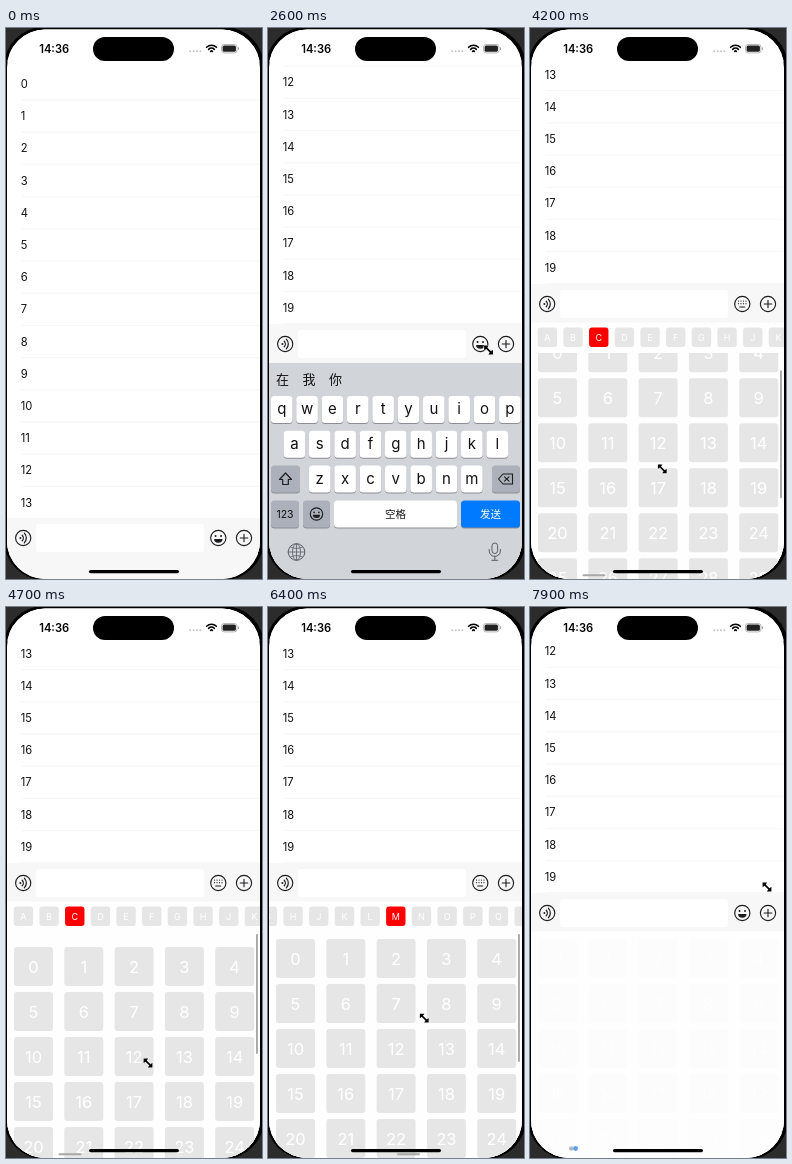
An HTML page for the animation above (8 s loop, 256 by 551 pixels).

```html
<!DOCTYPE html>
<html lang="zh">
<head>
<meta charset="utf-8">
<title>Chat input panels</title>
<style>
html, body { margin: 0; width: 100%; height: 100%; overflow: hidden; background: #000; }
svg { display: block; width: 100vw; height: 100vh; font-family: Inter, "Noto Sans CJK SC", "Noto Sans CJK", sans-serif; }
</style>
</head>
<body>
<svg id="stage" viewBox="0 0 256 551" preserveAspectRatio="none"></svg>
<script>
const LOOP = 8000, STEP = 100;
const ROW = 32.2, PAGE = 253, TAB = 25.67, TAB_START = 17.4, CENTER = 127.8;
const LETTERS = 'ABCDEFGHJKLMNOPQRSTWXYZ';
const INK = '#1c1c1e', THUMB = '#a8a8a8', TILE = '#e6e6e6';
const stage = document.getElementById('stage');

const rect = (x, y, w, h, fill, rx = 0, extra = '') =>
  `<rect x="${x}" y="${y}" width="${w}" height="${h}" rx="${rx}" fill="${fill}" ${extra}/>`;
const text = (x, y, size, s, fill = '#111', anchor = 'middle', extra = '') =>
  `<text x="${x}" y="${y}" font-size="${size}" fill="${fill}" text-anchor="${anchor}" ${extra}>${s}</text>`;
const line = (d, width = 1.1, color = INK) =>
  `<path d="${d}" fill="none" stroke="${color}" stroke-width="${width}" stroke-linecap="round" stroke-linejoin="round"/>`;
const ring = (x, y, r, width = 1.15, color = INK) =>
  `<circle cx="${x}" cy="${y}" r="${r}" fill="none" stroke="${color}" stroke-width="${width}"/>`;
const dot = (x, y, r, fill = INK) => `<circle cx="${x}" cy="${y}" r="${r}" fill="${fill}"/>`;
const group = (id, body) => `<g id="${id}">${body}</g>`;
const repeat = (n, fn) => Array.from({ length: n }, (_, i) => fn(i)).join('');
// Arc opening sideways (turn 0) or upwards (turn -90) around a centre.
const arc = (x, y, r, turn, width, color) =>
  `<g transform="translate(${x} ${y}) rotate(${turn})">`
  + line(`M${r * .7} ${-r * .7}A${r} ${r} 0 0 1 ${r * .7} ${r * .7}`, width, color) + '</g>';
const face = (x, y, r) => dot(x - r * .36, y - r * .25, r * .13) + dot(x + r * .36, y - r * .25, r * .13)
  + `<path d="M${x - r * .55} ${y + r * .12}h${r * 1.1}a${r * .55} ${r * .5} 0 0 1 ${-r * 1.1} 0Z" fill="${INK}"/>`;

function statusBar() {
  return rect(87, 9, 81, 24, '#000', 12)
    + text(33.2, 24.6, 11.2, '14:36', '#000', 'start', 'font-weight="600"')
    + repeat(4, i => dot(184.2 + i * 3.4, 23.3, 1, '#c4c4c6'))
    + repeat(3, i => arc(205.5, 24.2, 1.2 + i * 2.9, -90, 1.6, '#000'))
    + rect(215.5, 16.5, 15.5, 8.4, 'none', 2.6, 'stroke="#a5a5a8" stroke-width=".8"')
    + rect(216.6, 17.6, 13.3, 6.2, '#222', 1.6)
    + rect(232, 19.3, 1, 2.8, '#a5a5a8', .5);
}

function messageList() {
  return repeat(20, i => text(14.7, 60 + i * ROW, 11.2, i, '#111', 'start')
    + line(`M16 ${72 + i * ROW}H253`, .6, '#efeff0'));
}

function inputBar() {
  const y = 20, r = 7.6;
  const keys = repeat(8, i => dot(208.5 + i % 4 * 2.5, y - 2.9 + Math.floor(i / 4) * 2.6, .6))
    + line(`M209.7 ${y + 3}h5`);
  return rect(1, 0, PAGE, 38.5, '#f7f7f8')
    + rect(30, 6, 168, 28, '#fff', 3)
    + ring(17.2, y, r) + dot(14.4, y, 1) + repeat(2, i => arc(13.4, y, 4 + i * 3, 0, 1.25))
    + ring(212.3, y, r) + group('smile', face(212.3, y, r)) + group('keysIcon', keys)
    + ring(238, y, r) + line(`M234.2 ${y}h7.6M238 ${y - 3.8}v7.6`);
}

function keyboard() {
  const gray = '#abb0ba', tool = '#5b5f66';
  const key = (x, y, w, fill = '#fff') =>
    rect(x, y + 1, w, 27, '#8b8e94', 3.5) + rect(x, y, w, 27, fill, 3.5);
  const rows = ['qwertyuiop', 'asdfghjkl', 'zxcvbnm'].map((row, r) => repeat(row.length, i => {
    const x = CENTER + (i - (row.length - 1) / 2) * 25.35, y = 368 + r * 34.75;
    return key(x - 10.8, y, 21.6) + text(x, y + 18, 15, row[i]);
  })).join('');
  return rect(1, 335, PAGE, 217, '#d1d4d9')
    + repeat(3, i => text(14.5 + i * 26.5, 356, 13, '在我你'[i]))
    + rows
    + key(3, 437.5, 29, gray) + line('M17.5 445l-6 6.5h3.2v5h5.6v-5h3.2Z', 1.2)
    + key(224, 437.5, 28, gray) + line('M235 446h9.5v10h-9.5l-4.5-5ZM236.5 448.8l4.5 4.4m0-4.4l-4.5 4.4')
    + key(3, 472.5, 28, gray) + text(17, 490, 10.5, '123')
    + key(35, 472.5, 27, gray) + ring(48.5, 486, 6.2) + face(48.5, 486, 6.6)
    + key(66, 472.5, 123) + text(127.5, 490, 10.5, '空格')
    + key(193, 472.5, 59, '#007aff') + text(222.5, 490, 10.5, '发送', '#fff')
    + ring(28.5, 524, 8.3, 1, tool)
    + line('M20.2 524h16.6M28.5 515.7v16.6M22.5 519q6 3 12 0M22.5 529q6 -3 12 0', .8, tool)
    + `<ellipse cx="28.5" cy="524" rx="4" ry="8.3" fill="none" stroke="${tool}" stroke-width=".8"/>`
    + rect(224, 515, 5.6, 10.5, 'none', 2.8, `stroke="${tool}"`)
    + line('M221.2 521.5v1.5a5.6 5.4 0 0 0 11.2 0v-1.5M226.8 528.4v3.9m-3 0h6', 1, tool);
}

function stickerPanel() {
  const tabs = repeat(LETTERS.length, i =>
    rect(TAB_START + i * TAB - 9.7, 299.5, 19.4, 19.4, TILE, 3, 'class="tab"')
    + text(TAB_START + i * TAB, 312.6, 9, LETTERS[i], '#fff'));
  const page = left => repeat(45, i => {
    const x = left + 8 + i % 5 * 50.3, y = 332 + Math.floor(i / 5) * 45;
    return rect(x, y, 39, 39, TILE, 3) + text(x + 19.5, y + 25.5, 16.5, i, '#fff');
  });
  return rect(1, 294, PAGE, 258, '#fefefe')
    + group('panelContent',
      group('tabs', tabs)
      + `<g clip-path="url(#gridClip)">${group('grid', page(0) + page(PAGE))}</g>`
      + rect(0, 546.3, 23, 1.9, THUMB, 1, 'id="hThumb"')
      + rect(250, 327, 1.9, 128, THUMB, 1, 'id="vThumb"'));
}

const arrowHead = 'M-4.4 -4.4h4.6l-1.5 1.9L2.5 1.3L4.4 -.2v4.6h-4.6l1.5 -1.9L-2.5 -1.3L-4.4 .2Z';

stage.innerHTML = `<defs>
  <clipPath id="screen"><rect x="1" y="1.5" width="253" height="549.5" rx="38"/></clipPath>
  <clipPath id="gridClip"><rect x="1" y="325" width="253" height="226"/></clipPath></defs>`
  + rect(0, 0, 256, 551, '#2c2c2d')
  + rect(-2, -1, 260, 553, '#000', 40)
  + '<g clip-path="url(#screen)">'
  + rect(0, 0, 256, 551, '#fff')
  + group('list', messageList())
  + rect(0, 0, 256, 34, '#fff')
  + statusBar()
  + rect(1, 0, PAGE, 552, '#f7f7f8', 0, 'id="footer"')
  + group('keyboard', keyboard())
  + group('panel', stickerPanel())
  + group('bar', inputBar())
  + group('menuHint', dot(41.3, 541.5, 2.3, '#b4b9c0') + dot(45.6, 541.5, 2.4, '#5aa2ee'))
  + rect(83, 542, 90, 3.2, '#000', 1.6)
  + '</g>'
  + group('cursor', `<path d="${arrowHead}" stroke="#fff" paint-order="stroke"/>`);

const el = Object.fromEntries([...stage.querySelectorAll('[id]')].map(n => [n.id, n]));
const tabRects = [...stage.querySelectorAll('.tab')];

const progress = (t, from, to) => Math.min(1, Math.max(0, (t - from) / (to - from)));
const ramp = (t, from, to) => {
  const u = progress(t, from, to);
  return u * u * (3 - 2 * u);
};
const swing = (t, from, to) => Math.sin(Math.PI * progress(t, from, to));
const within = (t, from, to) => t >= from && t < to;
const move = (node, x, y) => node.setAttribute('transform', `translate(${x} ${y})`);
const show = (node, on) => node.setAttribute('visibility', on ? 'visible' : 'hidden');

// Places where the pointer rests: time, x, y.
const rests = [[200, 130, 430], [900, 130, 190], [1500, 115, 510], [2600, 220.5, 322],
  [3600, 119.5, 421], [4700, 142, 456], [5900, 172, 393], [7000, 135.5, 435], [7900, 237, 280]];
function pointer(t) {
  const i = Math.max(1, rests.findIndex(r => r[0] >= t));
  const [t0, x0, y0] = rests[i - 1], [t1, x1, y1] = rests[i];
  const u = ramp(t, t0, t1);
  return [x0 + (x1 - x0) * u, y0 + (y1 - y0) * u];
}

function draw(t) {
  const typing = ramp(t, 1500, 1900), picking = ramp(t, 2800, 3100);
  const closing = ramp(t, 7800, 7900);
  const bar = 490 - 194 * typing - 40 * picking + 30 * closing;
  const page = ramp(t, 3200, 3500) + ramp(t, 3800, 4100) + 8 * ramp(t, 5100, 5600) + ramp(t, 6050, 6350);
  const pull = 8 * swing(t, 4550, 4850) - 70 * swing(t, 4150, 4550) - 110 * swing(t, 6400, 6950);
  const panelOpen = within(t, 2800, 7900);

  move(el.list, 0, bar - 490 - 194 * ramp(t, 0, 1200));
  move(el.bar, 0, bar);
  move(el.footer, 0, bar);
  show(el.smile, !panelOpen);
  show(el.keysIcon, panelOpen);

  move(el.keyboard, 0, 217 * (1 - typing + picking));
  move(el.panel, 0, 258 * (1 - picking));
  el.panelContent.setAttribute('opacity', 1 - .94 * closing);

  const selected = Math.round(page);
  tabRects.forEach((tab, i) => tab.setAttribute('fill', i === selected ? '#f00' : TILE));
  move(el.tabs, -Math.max(0, TAB_START + page * TAB - CENTER), 0);
  move(el.grid, -(page % 1) * PAGE, pull);

  move(el.hThumb, 35.5 + 8.5 * page, 0);
  show(el.hThumb, within(t, 3200, 5000) || within(t, 6050, 7300));
  move(el.vThumb, 0, Math.max(0, -pull) * .57);
  el.vThumb.setAttribute('height', 128 - Math.max(0, pull));
  show(el.vThumb, within(t, 4150, 5000) || within(t, 6400, 7300));

  show(el.menuHint, closing === 1);
  show(el.cursor, t >= 200);
  move(el.cursor, ...pointer(t));
}

const start = performance.now();
function tick() {
  const t = (performance.now() - start) % LOOP;
  draw(Math.floor(t / STEP) * STEP);
  requestAnimationFrame(tick);
}
tick();
</script>
</body>
</html>
```
